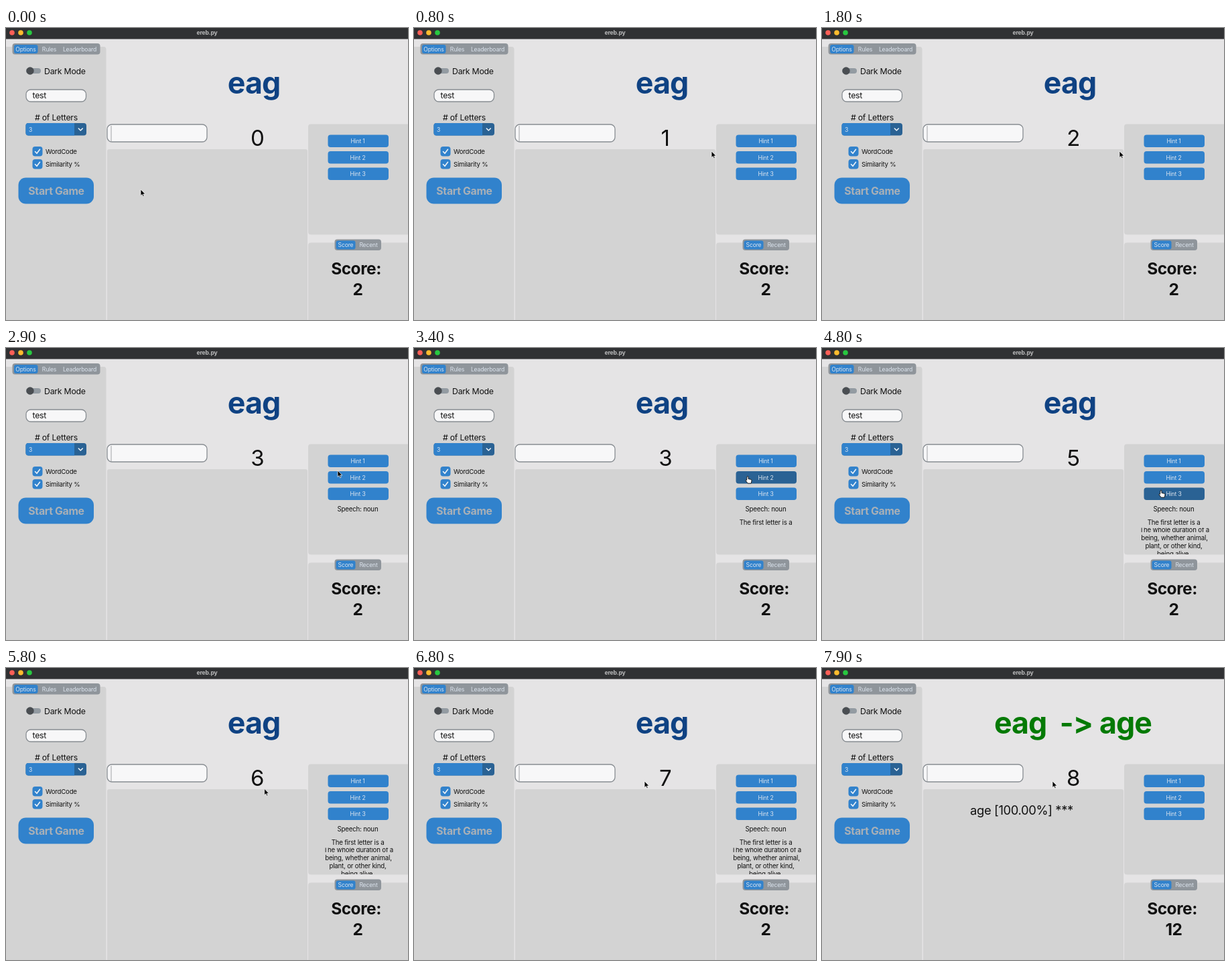
Recreate the animation shown at these times as an HTML page. Size 600 px wide and 436 px high, loop 8 s.

```html
<!DOCTYPE html>
<html lang="en">
<head>
<meta charset="utf-8">
<title>Word game</title>
<style>
html, body { margin: 0; width: 100%; height: 100%; overflow: hidden; background: #e5e4e5; }
svg { display: block; width: 600px; height: 436px; }
text { font-family: Inter, "Liberation Sans", sans-serif; letter-spacing: -.02em; white-space: pre; fill: #111; }
.mid { text-anchor: middle; }
.bold { font-weight: 700; }
.light text { font-size: 8.6px; fill: #dce4ee; }
.panel { fill: #d3d3d3; }
.blue { fill: #3182cc; }
.tabs { fill: #8f959b; }
.entry { fill: #f7f7f8; stroke: #888d92; stroke-width: 1.3; }
.tick { fill: none; stroke: #eef3f8; stroke-width: 1.6; stroke-linecap: round; stroke-linejoin: round; }
</style>
</head>
<body>
<svg viewBox="0 0 600 436">
  <clipPath id="defBox"><rect x="452" y="268.5" width="148" height="39.5"/></clipPath>
  <rect width="600" height="436" fill="#e5e4e5"/>
  <rect width="600" height="16.5" fill="#303133"/>
  <circle cx="9" cy="7" r="3.8" fill="#ff5f57"/>
  <circle cx="22" cy="7" r="3.8" fill="#febc2e"/>
  <circle cx="35" cy="7" r="3.8" fill="#28c840"/>
  <text class="mid bold" x="300" y="10" font-size="8.6" style="fill:#b9b9ba">ereb.py</text>

  <g class="panel">
    <rect y="28" x="-6" width="155.500" height="420" rx="4"/>
    <rect x="151" y="181" width="299" height="260" rx="3"/>
    <rect x="451" y="143.500" width="155" height="165" rx="4"/>
    <rect x="451" y="320.500" width="155" height="125" rx="4"/>
  </g>

  <g class="light mid">
    <rect class="tabs" x="9.500" y="23" width="131" height="16.500" rx="4"/>
    <rect class="blue" x="12" y="25" width="35.500" height="13" rx="3"/>
    <text x="29.500" y="34.700">Options</text>
    <text x="64.500" y="34.700">Rules</text>
    <text x="110" y="34.700">Leaderboard</text>
    <rect class="tabs" x="490.500" y="315.500" width="69.500" height="16.500" rx="4"/>
    <rect class="blue" x="492.500" y="317.500" width="29" height="13" rx="3"/>
    <text x="507" y="327.300">Score</text>
    <text x="541" y="327.300">Recent</text>
  </g>

  <rect x="30" y="60" width="22" height="8" rx="4" fill="#939ba2"/>
  <circle cx="36" cy="64" r="5.700" fill="#4a4e52"/>
  <text x="57" y="69" font-size="12.3">Dark Mode</text>
  <rect class="entry" x="30" y="92" width="89.500" height="18" rx="7"/>
  <text x="39.500" y="105" font-size="12.3">test</text>
  <text class="mid" x="75" y="138" font-size="12.3">#&#32;of Letters</text>
  <rect x="29.500" y="142" width="90.500" height="18.500" rx="4" fill="#2a6294"/>
  <path class="blue" d="M102 142H33.500q-4 0-4 4v10.500q0 4 4 4H102z"/>
  <path class="tick" d="M108.300 150l3 3 3-3"/>
  <g class="light"><text x="34" y="154.500">3</text></g>
  <g id="checks"></g>
  <text x="59" y="188" font-size="9.6">WordCode</text>
  <text x="59" y="207" font-size="9.6">Similarity %</text>
  <rect class="blue" x="18.500" y="223.500" width="112.500" height="39" rx="11"/>
  <text class="mid bold" x="75" y="249" font-size="15.8" style="fill:#a9b0b7">Start Game</text>

  <text id="word" class="mid bold" y="98" font-size="44.7"></text>
  <rect class="entry" x="151" y="144" width="149" height="26" rx="7"/>
  <text id="typed" x="157" y="163.500" font-size="18.500"></text>
  <rect id="caret" y="146" width="1" height="23" fill="#a2a4a6"/>
  <text id="count" class="mid" x="375" y="175.500" font-size="33"></text>
  <text id="guess" class="mid" x="298" y="219" font-size="18.4">age [100.00%] ***</text>

  <g id="hints" class="light mid"></g>
  <g class="mid" font-size="9.7">
    <text id="hint1" x="525" y="244">Speech: noun</text>
    <text id="hint2" x="525" y="263.700">The first letter is a</text>
    <g id="hint3" clip-path="url(#defBox)">
      <text x="526" y="275.300">The whole duration of a</text>
      <text x="526" y="287.300">being, whether animal,</text>
      <text x="525" y="299.300">plant, or other kind,</text>
      <text x="525" y="311.300">being alive.</text>
    </g>
  </g>
  <text class="mid bold" x="522.500" y="368" font-size="24.500">Score:</text>
  <text id="score" class="mid bold" x="525" y="399" font-size="24.500"></text>

  <g id="cursor">
    <path id="arrow" d="M0 0V9.500L2.200 7.500 3.700 10.800 5.200 10.100 3.800 7H6.800Z" stroke="#fff" stroke-width=".7"/>
    <path id="hand" d="M-1 0q1-1 2 0v3.500l4 .8q1.200.4 1 1.800l-.8 4h-5l-3.400-4.500q.6-1.200 1.800-.2z" fill="#fff" stroke="#111" stroke-width=".9"/>
  </g>
</svg>
<script>
const $ = id => document.getElementById(id);
const LOOP = 8000, SOLVED = 7800;
const hintTops = [159.5, 184, 208.5];

$('checks').innerHTML = [177, 196].map(y =>
  `<rect class="blue" x="39.500" y="${y}" width="15" height="14.500" rx="4"/>
   <path class="tick" d="M43.500 ${y + 7.5}l2.500 2.800 4.500-6"/>`).join('');
$('hints').innerHTML = hintTops.map((y, i) =>
  `<rect x="480.500" y="${y}" width="90.500" height="18.500" rx="4"/>
   <text x="525" y="${y + 12.5}">Hint ${i + 1}</text>`).join('');
const buttons = $('hints').querySelectorAll('rect');

// pointer stops: time, x, y
const path = [
  [100, 201, 241], [600, 444, 184], [1800, 444, 184], [2250, 491, 169],
  [2700, 491, 169], [2900, 495, 183], [3100, 498, 192], [3600, 498, 192],
  [4000, 506, 213], [5400, 506, 213], [6000, 344, 169]
];
// caret flips, starting visible
const blinks = [200, 500, 1100, 1400, 2100, 2450, 3100, 3450, 4100, 4400, 5400, 5750, 6400, 6700];
const keys = [7300, 7500, 7650];

function pointer(t) {
  const i = path.findIndex(p => p[0] > t);
  if (i === 0) return path[0].slice(1);
  if (i < 0) return path[path.length - 1].slice(1);
  const [t0, x0, y0] = path[i - 1], [t1, x1, y1] = path[i];
  const u = (t - t0) / (t1 - t0), e = u * u * (3 - 2 * u);
  return [x0 + (x1 - x0) * e, y0 + (y1 - y0) * e];
}

const show = (id, on) => $(id).setAttribute('visibility', on ? 'visible' : 'hidden');

function draw(t) {
  const solved = t >= SOLVED;
  const [x, y] = pointer(t);
  const over = hintTops.findIndex(top => x > 480 && x < 571 && y > top && y < top + 18.5);
  buttons.forEach((b, i) => b.setAttribute('fill', i === over ? '#2a6294' : '#3182cc'));
  $('cursor').setAttribute('transform', `translate(${x} ${y})`);
  show('arrow', over < 0);
  show('hand', over >= 0);

  [2500, 3300, 4650].forEach((at, i) => show('hint' + (i + 1), t >= at && !solved));

  $('word').textContent = solved ? 'eag  -> age' : 'eag';
  $('word').setAttribute('x', solved ? 374.5 : 370);
  $('word').style.fill = solved ? '#057a05' : '#0f4283';
  $('count').textContent = Math.floor((t + 650) / 1050);
  $('score').textContent = solved ? 12 : 2;
  show('guess', solved);

  const typed = solved ? '' : 'age'.slice(0, keys.filter(k => k <= t).length);
  $('typed').textContent = typed;
  $('caret').setAttribute('x', 156.5 + (typed ? $('typed').getComputedTextLength() : 0));
  show('caret', blinks.filter(b => b <= t).length % 2 === 0);
}

const start = performance.now();
function tick() {
  draw((performance.now() - start) % LOOP);
  requestAnimationFrame(tick);
}
draw(0);
requestAnimationFrame(tick);
</script>
</body>
</html>
```
